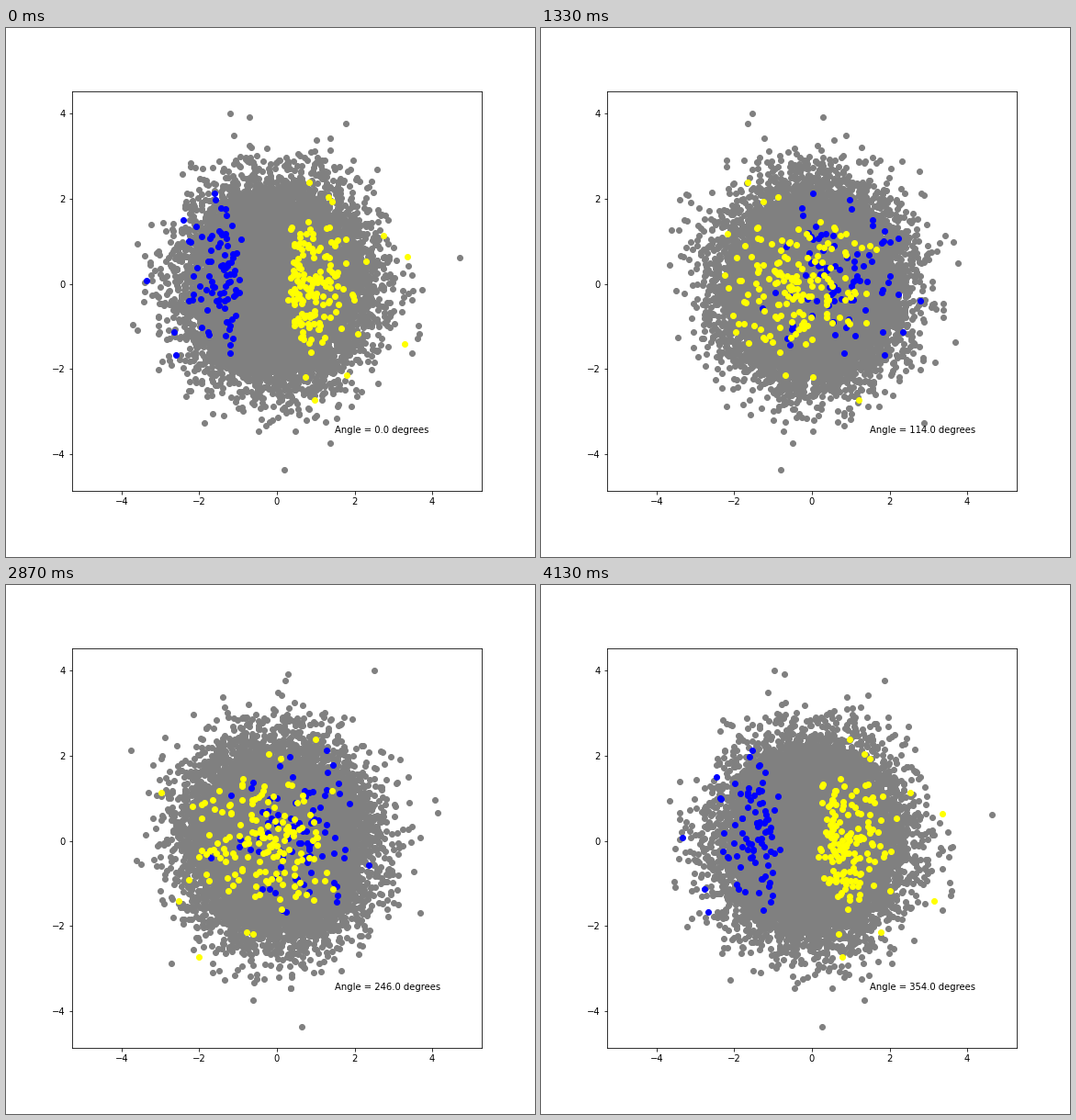
Recreate the animation shown at these times as a matplotlib script. Size 576x576 px, loop 4.2 s.

```python
import numpy as np
import matplotlib.pyplot as plt
from matplotlib.animation import FuncAnimation

STEP = 6            # degrees per frame
FRAMES = 360 // STEP

rng = np.random.default_rng(11)


def bounded(draw, n, limit):
    """The first n values of a random draw whose size stays below a limit."""
    v = draw(4 * n)
    return v[np.abs(v) < limit][:n]


def normal(n, sd, limit):
    return bounded(lambda k: rng.normal(0, sd, k), n, limit)


def round_cloud(n):
    p = rng.standard_normal((n, 3))
    inside = (np.hypot(p[:, 0], p[:, 2]) < 4.2) & (np.abs(p[:, 1]) < 3.6)
    return p[inside]


def side_cloud(n, edge, sign, shape, scale, height, depth):
    """Points whose x starts at an edge and thins out away from the centre."""
    dist = bounded(lambda k: rng.gamma(shape, scale, k), n, 2.2)
    return np.column_stack([sign * (edge + dist),
                            normal(n, .93, height), normal(n, depth, 2.1)])


def project(p, degrees):
    a = np.radians(degrees)
    return np.column_stack([p[:, 0] * np.cos(a) + p[:, 2] * np.sin(a), p[:, 1]])


# Each cloud carries a few fixed extremes (x, y, z)
gray = np.vstack([round_cloud(17000),
                  [(4.70, .63, .35), (-1.20, 4.02, -2.22), (-.72, 3.93, 0),
                   (1.77, 3.78, -1.03), (.18, -4.37, -.79), (1.37, -3.75, .07)]])
blue = np.vstack([side_cloud(84, .9, -1, 2.2, .27, 2, .9),
                  [(-3.36, .08, -.14), (-1.62, 2.13, -.69), (-1.34, -.40, 2.45)]])
yellow = np.vstack([side_cloud(152, .25, 1, 2.5, .28, 2.2, 1),
                    [(3.36, .65, -.20), (3.30, -1.40, 1.30), (2.75, 1.13, 2.03),
                     (.98, -2.73, 1.77), (.83, 2.38, -1.45)]])
groups = [(gray, "gray"), (blue, "blue"), (yellow, "yellow")]

fig, ax = plt.subplots(figsize=(8, 8), dpi=72)
fig.subplots_adjust(left=.125, right=.9, bottom=.125, top=.88)
ax.set_xlim(-5.275, 5.285)
ax.set_ylim(-4.865, 4.525)

dots = [ax.scatter(*project(p, 0).T, s=36, c=color, linewidths=1)
        for p, color in groups]
label = ax.text(1.5, -3.5, "")


def update(i):
    angle = STEP * i
    for dot, (p, _) in zip(dots, groups):
        dot.set_offsets(project(p, angle))
    label.set_text(f"Angle = {angle:.1f} degrees")
    return [*dots, label]


anim = FuncAnimation(fig, update, frames=FRAMES, interval=70, repeat=True)
plt.show()
```
